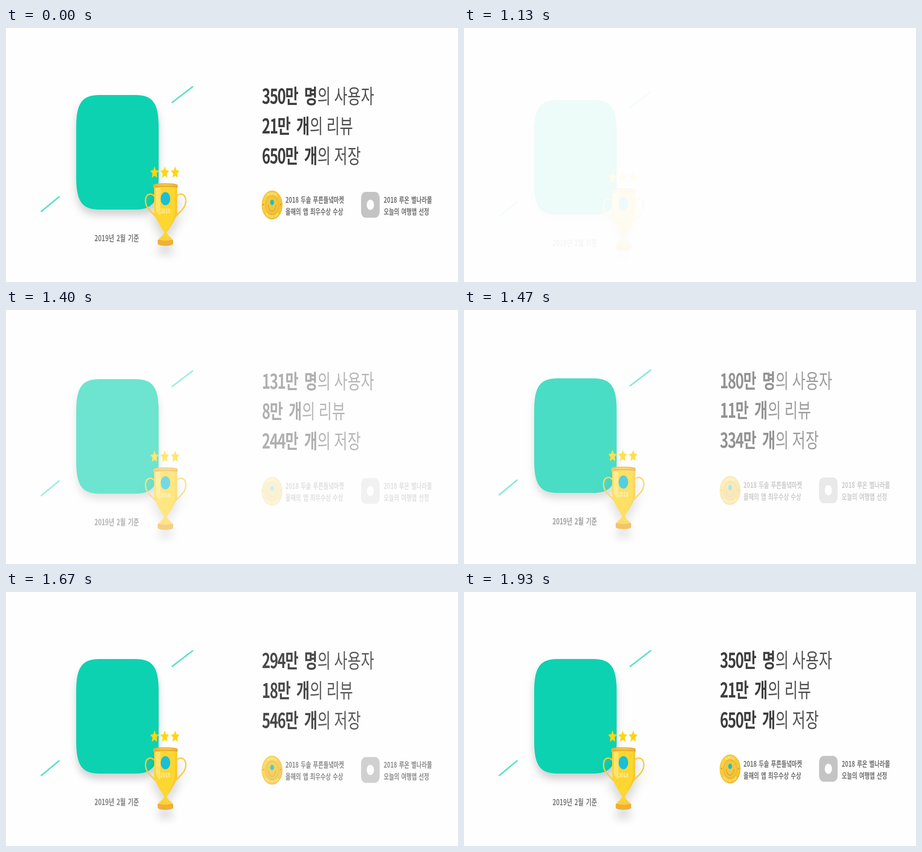
These frames come from a looping animation (998 px wide and 561 px high, 1.99 s). An HTML page:

```html
<!DOCTYPE html>
<html lang="ko">
<head>
<meta charset="utf-8">
<title>Counters</title>
<style>
  html, body { margin: 0; width: 100%; height: 100%; overflow: hidden; background: #fefefe; }
  svg { display: block; width: 100%; height: 100%; }
  text { font-family: "Noto Sans CJK KR", "Noto Sans CJK", sans-serif; }
  .metric { font-size: 37.5px; font-weight: 300; fill: #505050; word-spacing: -1.5px; }
  .metric .strong { font-weight: 700; fill: #3e3e3e; word-spacing: 4px; }
  .metric .count { letter-spacing: -2px; }
  .award { font-size: 14.6px; font-weight: 700; fill: #707070; word-spacing: 1px; }
  .caption { font-size: 15.6px; font-weight: 700; fill: #7c7c7c; word-spacing: 1.6px; text-anchor: middle; }
  .year { font-size: 11.5px; fill: #fffbe8; text-anchor: middle; }
  .engraving { font-size: 5.6px; font-weight: 700; fill: #ffec94; text-anchor: middle; }
  .tile { filter: drop-shadow(0 12px 9px rgba(0, 0, 0, .18)); }
  .trophy { filter: drop-shadow(0 20px 10px rgba(0, 0, 0, .15)); }
</style>
</head>
<body>
<svg viewBox="0 0 998 561" preserveAspectRatio="none">
  <defs>
    <path id="star" fill="#ffd60f"/>
    <path id="arcTop" d="M-19.6 0A19.6 19.6 0 0 1 19.6 0"/>
    <path id="arcBottom" d="M-24.2 0A24.2 24.2 0 0 0 24.2 0"/>
    <linearGradient id="gold" x2="1" y2="1">
      <stop stop-color="#fbd648"/>
      <stop offset="1" stop-color="#f2bd2c"/>
    </linearGradient>
  </defs>

  <g class="block">
    <path class="tile" fill="#0dd2b2"
      d="M155 219C155 166 168 148 206 148H286C324 148 337 166 337 219V330C337 383 324 401 286 401H206C168 401 155 383 155 330Z"/>
    <path d="M366 165L413 129M77 406L118 372" stroke="#5ce0c6" stroke-width="3.4"/>
    <text class="caption" transform="translate(244.5 471) scale(.852 1.182)">2019년 2월 기준</text>
    <use href="#star" x="328" y="319.5"/>
    <use href="#star" x="350.5" y="319.5"/>
    <use href="#star" x="373.5" y="319.5"/>
    <g class="trophy">
      <path d="M328 372C322 364 308 364 308 382C308 397 320 405 331 417M376 372C382 364 397 364 397 382C397 397 385 405 374 417"
        fill="none" stroke="#f9cb3e" stroke-width="3"/>
      <path d="M327 348H378V408Q377 418 354 453H350Q328 418 327 408Z" fill="#fdd62f"/>
      <path d="M331 353H341V414Q332 410 331 400Z" fill="#ffe46c"/>
      <path d="M373 353H378V408Q377 418 358 447Q372 420 373 408Z" fill="#f8ca30"/>
      <path d="M325 347Q326 343 352 343T379 347V353Q352 349 325 353Z" fill="#e9ad35"/>
      <path d="M328 347Q352 343 376 347Q352 349 328 347Z" fill="#f9cc4a"/>
      <path d="M350 451H354Q358 460 368 465H336Q346 460 350 451Z" fill="#fdd62f"/>
      <path d="M335 468Q352 460 369 468V477Q366 481 352 481T335 477Z" fill="#eeb038"/>
      <path d="M336 467Q352 460 368 467Q352 473 336 467Z" fill="#fbcf3e"/>
      <ellipse cx="352" cy="377" rx="10.5" ry="14.6" fill="#18bfd6"/>
      <text class="year" transform="translate(352 409) scale(.852 1.182)">2018</text>
    </g>
  </g>

  <g class="block" id="metrics"></g>

  <g class="block">
    <g transform="translate(587.5 391) scale(.852 1.182)">
      <circle r="27" fill="url(#gold)"/>
      <circle r="26.2" fill="none" stroke="#ecb52c"/>
      <circle r="17" fill="#f3c63c" stroke="#e0aa2a"/>
      <path d="M-10 0Q-9 10 0 12Q9 10 10 0" fill="none" stroke="#e2b030" stroke-width="2.5"/>
      <circle cy="-5" r="5" fill="#18bfc9"/>
      <circle cx="-22" cy="-1" r="1.6" fill="#cf9720"/>
      <circle cx="22" cy="-1" r="1.6" fill="#cf9720"/>
      <text class="engraving"><textPath href="#arcTop" startOffset="50%">WINNER</textPath></text>
      <text class="engraving"><textPath href="#arcBottom" startOffset="50%">BEST OF YEAR</textPath></text>
    </g>
    <text class="award" transform="translate(617 385.5) scale(.852 1.182)">2018 두솔 푸른들녘마켓</text>
    <text class="award" transform="translate(617 411.5) scale(.852 1.182)">올해의 앱 최우수상 수상</text>
    <rect x="784" y="362" width="41" height="57" rx="10" ry="14" fill="#c4c4c4"/>
    <ellipse cx="804.5" cy="390.5" rx="8" ry="11.2" fill="#fff"/>
    <text class="award" transform="translate(834 385.5) scale(.852 1.182)">2018 루온 별나라몰</text>
    <text class="award" transform="translate(834 411.5) scale(.852 1.182)">오늘의 여행앱 선정</text>
  </g>
</svg>

<script>
  const LOOP = 1990, HIDE = 870, SHOW = 1130, STEP = 200 / 3;
  const FADE = 650, RISE = 11.8;
  const BLOCK_STARTS = [1026, 1115, 1205];
  const COUNT_CURVE = [0, .18, .375, .652, .84, .95, 1]; // one value per two steps
  const METRICS = [
    { total: 350, unit: '만 명', label: '의 사용자' },
    { total: 21, unit: '만 개', label: '의 리뷰' },
    { total: 650, unit: '만 개', label: '의 저장' },
  ];

  const starPoints = Array.from({ length: 10 }, (_, i) => {
    const angle = i * Math.PI / 5, radius = i % 2 ? .48 : 1;
    return `${10 * radius * Math.sin(angle)} ${-14 * radius * Math.cos(angle)}`;
  });
  document.getElementById('star').setAttribute('d', `M${starPoints.join('L')}Z`);

  document.getElementById('metrics').innerHTML = METRICS.map(({ unit, label }, row) =>
    `<text class="metric" transform="translate(565 ${167.3 + row * 65.8}) scale(.852 1.182)">` +
    `<tspan class="strong count"></tspan><tspan class="strong">${unit}</tspan>${label}</text>`).join('');

  const blocks = document.querySelectorAll('.block');
  const counts = document.querySelectorAll('.count');

  const clamp = v => Math.min(1, Math.max(0, v));
  const ease = v => v * v * (3 - 2 * v);

  function countProgress(step) {
    const position = Math.min(step / 2, COUNT_CURVE.length - 1);
    const i = Math.floor(position);
    const next = COUNT_CURVE[i + 1] ?? 1;
    return COUNT_CURVE[i] + (next - COUNT_CURVE[i]) * (position - i);
  }

  function render(time) {
    const settled = time < HIDE;
    const hidden = !settled && time < SHOW;
    const step = Math.max(0, Math.floor((time - SHOW + .5) / STEP));
    const pose = SHOW + step * STEP;

    blocks.forEach((block, i) => {
      const shown = settled ? 1 : hidden ? 0 : ease(clamp((pose - BLOCK_STARTS[i]) / FADE));
      block.setAttribute('opacity', shown);
      block.setAttribute('transform', `translate(0 ${RISE * (1 - shown)})`);
    });

    const progress = settled ? 1 : countProgress(step);
    counts.forEach((count, i) => {
      count.textContent = Math.round(METRICS[i].total * progress);
    });
  }

  const start = performance.now();
  function tick() {
    render((performance.now() - start) % LOOP);
    requestAnimationFrame(tick);
  }
  tick();
</script>
</body>
</html>
```
